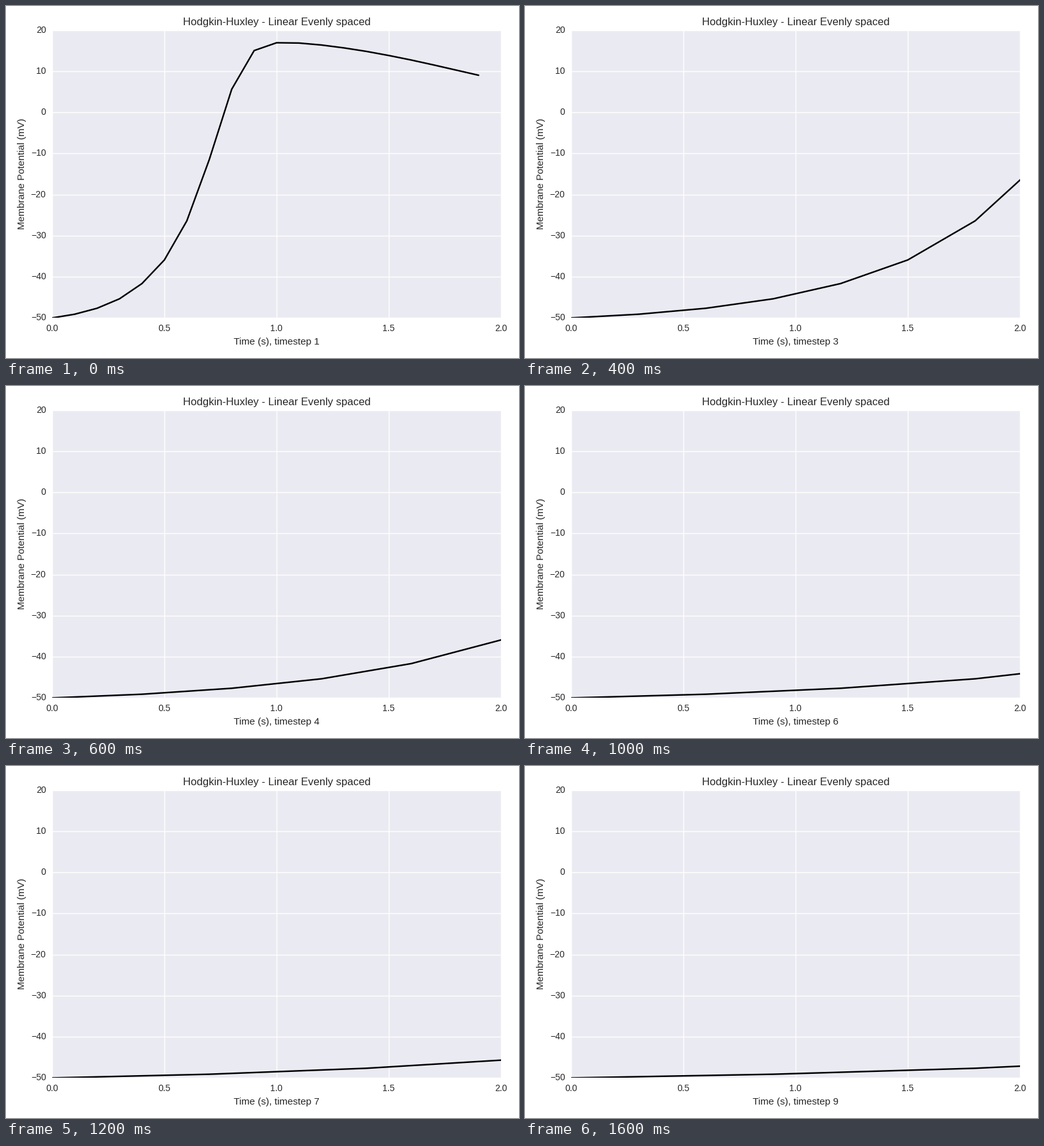
A matplotlib script that plays this animation: 800 px wide and 550 px high, repeating every 1800 ms.

```python
import numpy as np
import matplotlib.pyplot as plt
from matplotlib.animation import FuncAnimation

W, H, DPI = 800, 550, 100
LEFT, RIGHT, TOP, BOTTOM = 72, 772, 37.5, 487.4
INK = "#262626"
STEPS = 9

plt.rcParams["font.family"] = "Liberation Sans"

# Membrane potential in mV, one sample per tenth of a time unit
VOLTS = np.array([-50, -49.1, -47.65, -45.35, -41.65, -35.9, -26.4, -11.5,
                  5.6, 15.0, 16.9, 16.83, 16.35, 15.65, 14.8, 13.8,
                  12.7, 11.5, 10.25, 9.0])
TIMES = 0.1 * np.arange(len(VOLTS))

fig = plt.figure(figsize=(W / DPI, H / DPI), dpi=DPI, facecolor="white")
ax = fig.add_axes([LEFT / W, 1 - BOTTOM / H,
                   (RIGHT - LEFT) / W, (BOTTOM - TOP) / H])
ax.set_facecolor("#EAEAF2")
ax.set_xlim(0, 2)
ax.set_ylim(-50, 20)
ax.set_xticks(np.arange(0, 2.1, 0.5))
ax.set_yticks(np.arange(-50, 21, 10))
ax.set_axisbelow(True)
ax.grid(True, color="white", linewidth=1, linestyle="-")
ax.tick_params(length=0, labelbottom=False, labelleft=False)
for spine in ax.spines.values():
    spine.set_visible(False)


def label(x, y, text, size, ha="center", **kw):
    """Place text with its baseline at pixel (x, y), y counted from the top."""
    return fig.text(x / W, 1 - y / H, text, size=size, ha=ha,
                    va="baseline", color=INK, **kw)


mid_x, mid_y = (LEFT + RIGHT) / 2, (TOP + BOTTOM) / 2
label(mid_x, 30, "Hodgkin-Huxley - Linear Evenly spaced", 12)
label(29, mid_y, "Membrane Potential (mV)", 11,
      rotation=90, rotation_mode="anchor")
x_label = label(mid_x, 529, "", 11)

for t in ax.get_xticks():
    label(LEFT + (RIGHT - LEFT) * t / 2, 508, f"{t:.1f}", 10)
for v in ax.get_yticks():
    y = TOP + (BOTTOM - TOP) * (20 - v) / 70
    label(62.5, y + 4, f"{v:.0f}".replace("-", "\u2212"), 10, ha="right")

line, = ax.plot([], [], color="black", linewidth=1.75,
                solid_capstyle="round")


def update(i):
    step = i + 1
    line.set_data(TIMES * step, VOLTS)
    x_label.set_text(f"Time (s), timestep {step}")
    return line, x_label


anim = FuncAnimation(fig, update, frames=STEPS, interval=200,
                     repeat=True, repeat_delay=0, blit=False)
plt.show()
```
